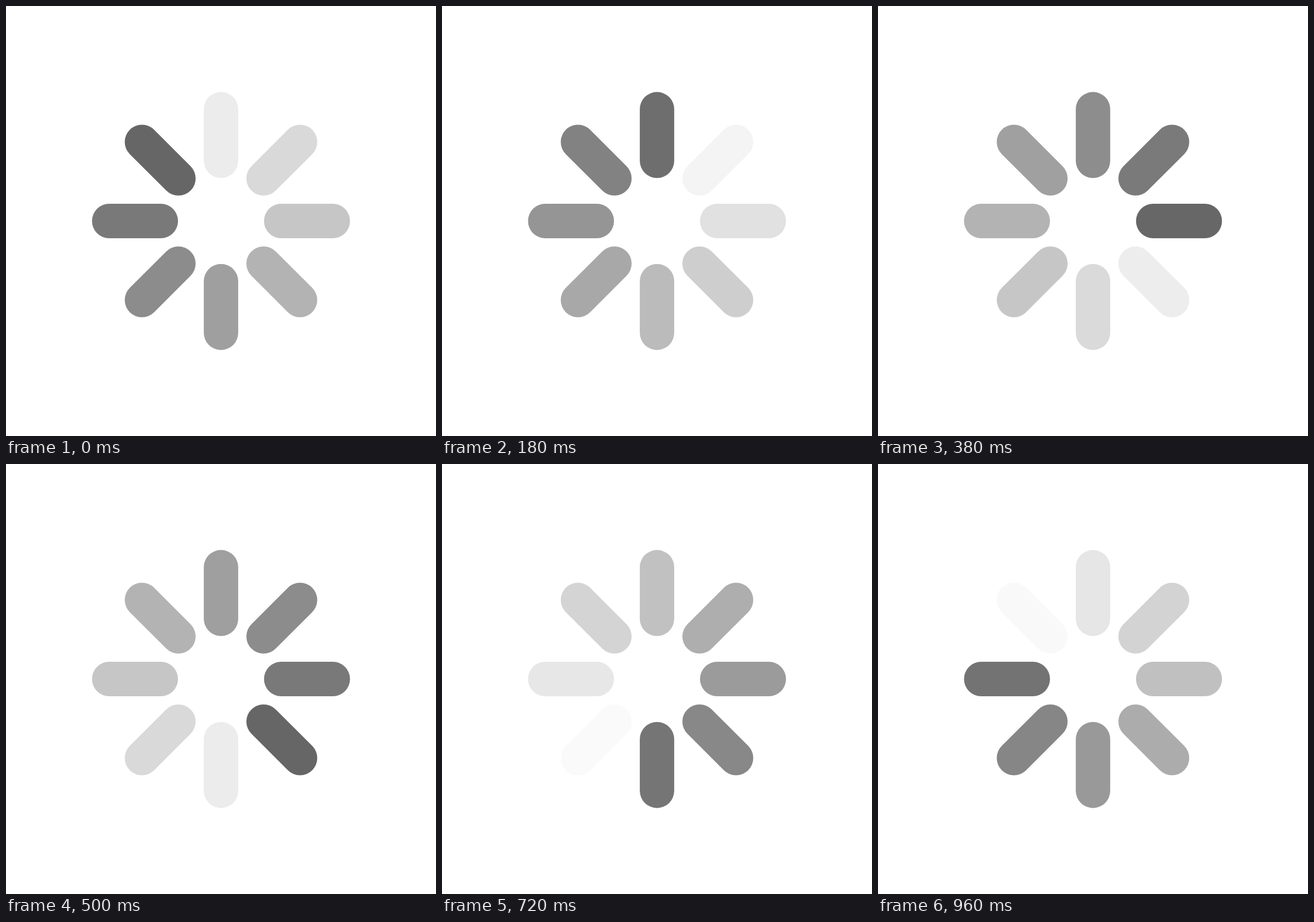
These frames come from a looping animation (748 px wide and 748 px high, 1 s). An HTML page with a canvas:

```html
<!DOCTYPE html>
<html lang="en">
<head>
<meta charset="utf-8">
<title>Spinner</title>
<style>
  html, body { margin: 0; width: 100%; height: 100%; overflow: hidden; background: #fff; }
  canvas { display: block; }
</style>
</head>
<body>
<canvas id="stage" width="748" height="748"></canvas>
<script>
const ctx = document.getElementById('stage').getContext('2d');
const SIZE = 748, LOOP = 1000, BARS = 8;
const UNIT = SIZE / 100;

// The fade advances in uneven steps; each pose holds until the next time.
const STEPS = [0, 20, 120, 140, 180, 260, 360, 380, 480, 500,
               600, 640, 720, 760, 860, 880, 960];

const poseTime = t => STEPS.findLast(step => step <= t);

function drawBar(i, t) {
  const start = (i + 1) * LOOP / BARS;
  const age = ((t - start + LOOP) % LOOP) / LOOP;
  const grey = Math.round(102 + 153 * age);
  ctx.save();
  ctx.rotate(i * 2 * Math.PI / BARS);
  ctx.strokeStyle = `rgb(${grey}, ${grey}, ${grey})`;
  ctx.beginPath();
  ctx.moveTo(0, -26);
  ctx.lineTo(0, -14);
  ctx.stroke();
  ctx.restore();
}

function draw(t) {
  ctx.setTransform(1, 0, 0, 1, 0, 0);
  ctx.fillStyle = '#fff';
  ctx.fillRect(0, 0, SIZE, SIZE);
  ctx.setTransform(UNIT, 0, 0, UNIT, SIZE / 2, SIZE / 2);
  ctx.lineWidth = 8;
  ctx.lineCap = 'round';
  for (let i = 0; i < BARS; i++) drawBar(i, t);
}

const origin = performance.now();

function tick() {
  draw(poseTime((performance.now() - origin) % LOOP));
  requestAnimationFrame(tick);
}
tick();
</script>
</body>
</html>
```
